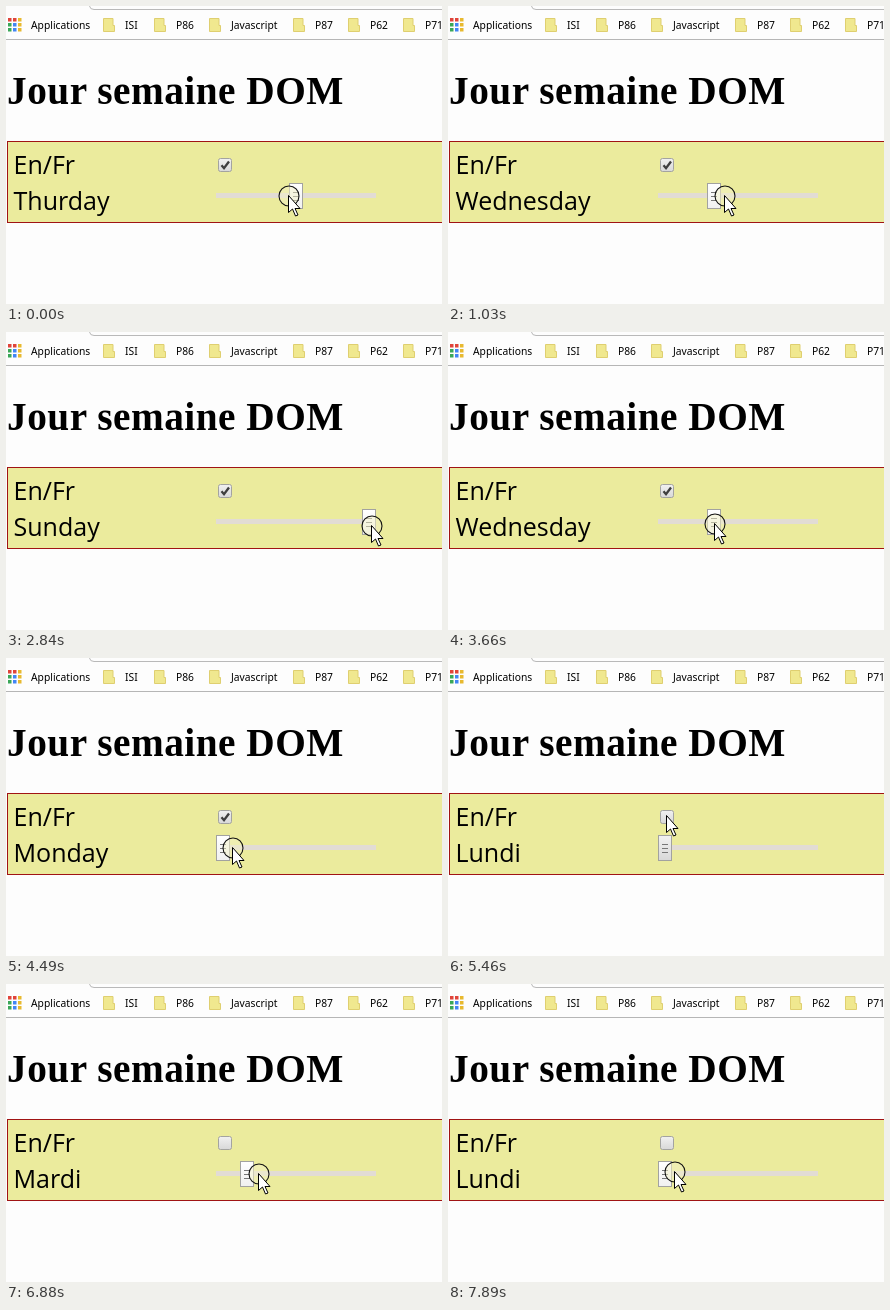
An HTML page that plays this animation: 436x298 px, repeating every 8000 ms.

```html
<!DOCTYPE html>
<html lang="fr">
<head>
<meta charset="utf-8">
<title>Jour semaine DOM</title>
<style>
html, body { margin: 0; width: 100%; height: 100%; overflow: hidden; background: #fdfdfd; }
svg { display: block; width: 436px; height: 298px; }
.bar { font: 10.3px "Noto Sans", sans-serif; }
.title { font: bold 39.3px "Liberation Serif", serif; letter-spacing: .5px; }
.label { font: 25px "Open Sans", sans-serif; }
</style>
</head>
<body>
<svg viewBox="0 0 436 298" xmlns="http://www.w3.org/2000/svg">
  <defs>
    <linearGradient id="grey" x2="0" y2="1">
      <stop stop-color="#f1f1f1"/><stop offset="1" stop-color="#d8d8d8"/>
    </linearGradient>
    <linearGradient id="light" x2="0" y2="1">
      <stop stop-color="#fff"/><stop offset="1" stop-color="#f0f0f0"/>
    </linearGradient>
    <path id="folder" d="M.5 .5h9.500v7h1.500v6H.5z" fill="#f0e88f" stroke="#dfcf70"/>
  </defs>
  <path d="M83.500 0Q84 3.500 88 3.500H436" fill="none" stroke="#b9b9b9"/>
  <path d="M0 33.500H436" stroke="#b6b6b6"/>
  <g id="apps"></g>
  <g id="marks" class="bar"><text x="25" y="23">Applications</text></g>
  <text class="title" x="1" y="98">Jour semaine DOM</text>

  <rect x="1.500" y="135.500" width="440" height="81" fill="#ebeb9d" stroke="#a01414"/>
  <text class="label" x="7.500" y="168">En/Fr</text>
  <text class="label" id="day" x="7.500" y="204"></text>

  <rect x="212.500" y="152.500" width="13" height="13" rx="2" fill="url(#grey)" stroke="#a3a3a0"/>
  <path id="tick" d="M215.500 159.300l2.500 2.900 5-6.700" fill="none" stroke="#3f3f3f" stroke-width="2.300"/>

  <rect x="210" y="187" width="160" height="5" fill="#e2dcd4"/>
  <g id="thumb">
    <rect id="face" x="-6.500" y="177.500" width="13" height="25" stroke="#a2a2a0"/>
    <path d="M-3 186.500h6m-6 4h6m-6 4h6" stroke="#777"/>
  </g>
  <g id="cursor">
    <circle id="ring" r="10" fill="#f4f2c8" fill-opacity=".5" stroke="#111" stroke-width="1.100"/>
    <path d="M-.5 -.5V16.500l4-3.500 3 7 2.500-1-3-6.500h5z" fill="#fff" stroke="#000"/>
  </g>
</svg>
<script>
const LOOP = 8000, STEP = 143;
const $ = id => document.getElementById(id);
const days = {
  en: ["Monday", "Tuesday", "Wednesday", "Thurday", "Friday", "Saturday", "Sunday"],
  fr: ["Lundi", "Mardi", "Mercredi", "Jeudi", "Vendredi", "Samedi", "Dimanche"]
};

// Where the hand turns or rests, timed in screen refreshes
const stops = [
  { at: -2, x: 270, y: 190 },
  { at: 4, x: 320, y: 190 },
  { at: 8.5, x: 262, y: 190 },
  { at: 16.5, x: 366, y: 194 },
  { at: 19, x: 366, y: 194 },
  { at: 26, x: 262, y: 192 },
  { at: 33, x: 219, y: 189 },
  { at: 35, x: 219, y: 189 },
  { at: 37, x: 219, y: 158 },
  { at: 38, x: 219, y: 158 },
  { at: 40, x: 219, y: 189 },
  { at: 42, x: 219, y: 189 },
  { at: 51.5, x: 267, y: 190 },
  { at: 53, x: 267, y: 190 },
  { at: 56, x: 214, y: 187 }
];

function hand(step) {
  const next = stops.findIndex(s => s.at > step);
  const a = stops[next - 1], b = stops[next];
  const ease = (1 - Math.cos(Math.PI * (step - a.at) / (b.at - a.at))) / 2;
  const mix = k => Math.round(a[k] + (b[k] - a[k]) * ease);
  return { x: mix("x"), y: mix("y") };
}

function addMarks() {
  const [red, yellow, green, blue] = ["#e0443a", "#e8b92f", "#3aa757", "#4285f4"];
  const dots = [red, red, yellow, green, blue, yellow, green, blue, yellow];
  $("apps").innerHTML = dots.map((c, i) =>
    `<rect x="${2 + i % 3 * 5}" y="${12 + Math.floor(i / 3) * 5}" width="3.500" height="3.500" fill="${c}"/>`).join("");
  const marks = { ISI: 97, P86: 148, Javascript: 203, P87: 287, P62: 342, P71: 397 };
  $("marks").innerHTML += Object.entries(marks).map(([name, x]) =>
    `<use href="#folder" x="${x}" y="12"/><text x="${x + 22}" y="23">${name}</text>`).join("");
}

function draw(time) {
  const step = Math.floor(time / STEP);
  const { x, y } = hand(Math.min(step, 55));
  const french = step >= 38;
  const dragging = step < 34 || step >= 42;
  const clicking = step === 37;
  const gap = 146 / 6;
  const index = Math.max(0, Math.min(6, Math.round((x - 217) / gap)));

  $("day").textContent = days[french ? "fr" : "en"][index];
  $("tick").style.display = french ? "none" : "";
  $("thumb").setAttribute("transform", `translate(${Math.round(217 + index * gap)})`);
  $("face").setAttribute("fill", dragging ? "url(#light)" : "url(#grey)");
  $("ring").style.display = dragging || clicking ? "" : "none";
  $("cursor").setAttribute("transform", `translate(${x} ${y})`);
}

function loop() {
  draw(performance.now() % LOOP);
  requestAnimationFrame(loop);
}

addMarks();
loop();
</script>
</body>
</html>
```
